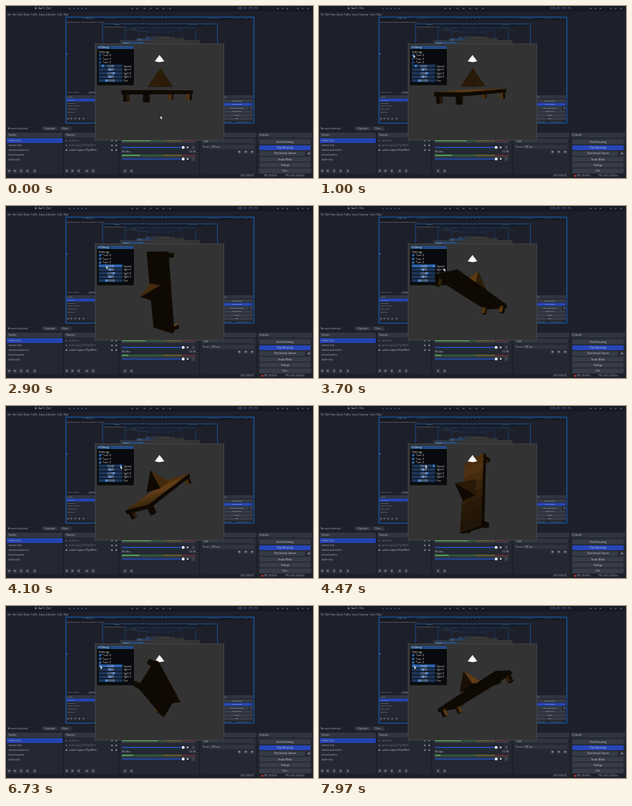
An HTML page that plays this animation: 384x216 px, repeating every 8000 ms.

```html
<!DOCTYPE html>
<html lang="en">
<head>
<meta charset="utf-8">
<title>Table viewer</title>
<style>
html, body { margin: 0; width: 100%; height: 100%; overflow: hidden; background: #1b1e27; }
svg { display: block; width: 100vw; height: 100vh; }
text { font-family: "Open Sans", "Noto Sans", sans-serif; white-space: pre; }
</style>
</head>
<body>
<svg id="stage" viewBox="0 0 384 216"></svg>
<script>
const LOOP = 8000;
const stage = document.getElementById('stage');
const clamp = (v, a, b) => Math.min(b, Math.max(a, v));

// ---- markup helpers
const rect = (x, y, w, h, fill, extra = '') =>
  `<rect x="${x}" y="${y}" width="${w}" height="${h}" fill="${fill}" ${extra}/>`;
const label = (x, y, s, size = 3, fill = '#a9aeb9', extra = '') =>
  `<text x="${x}" y="${y}" font-size="${size}" fill="${fill}" ${extra}>${s}</text>`;
const mid = (x, y, s, size, fill) => label(x, y, s, size, fill, 'text-anchor="middle"');
const dots = (xs, y, fill = '#a3a8b4', size = 1.7) =>
  xs.map(x => rect(x - size / 2, y - size / 2, size, size, fill, 'rx=".5"')).join('');
const tools = (xs, y) =>
  xs.map(x => rect(x - 2.5, y - 2.5, 5, 5, '#343945', 'rx=".8"')).join('') + dots(xs, y);

function dock(x, w, title) {
  return rect(x, 159, w, 52, '#242832', 'rx="1"') + rect(x, 159, w, 6, '#303541', 'rx="1"') +
    label(x + 2, 163.2, title, 3, '#c8ccd5');
}

function topBar() {
  return rect(0, 0, 384, 7, '#161a25') +
    label(36, 4, 'A  Sat 5  Oct', 3.6, '#c3c9d6') + dots([80, 85, 90, 95, 100], 3, '#5f7ca2', 1.4) +
    dots([158, 164, 173, 181, 189, 197, 205], 3, '#818ca2', 1.4) +
    label(290, 4, 'MIX  20   CPU  9%', 3.1, '#6b88b0') +
    dots([340, 346, 352, 365, 371, 378], 3, '#818ca2', 1.4) +
    label(2, 11.8, 'File  Edit  View  Docks  Profile  Scene Collection  Tools  Help', 2.8);
}

function lists() {
  const scenes = ['screen only', 'camera only', 'camera and screen', 'virtual camera', 'audio only'];
  const sources = ['webcam', 'audio capture (PipeWire)', 'screen capture (PipeWire)'];
  return label(2, 155, 'No source selected', 2.8) +
    rect(45, 151.5, 20, 5, '#303541', 'rx="1"') + label(48, 155, 'Properties', 2.8) +
    rect(67, 151.5, 15, 5, '#303541', 'rx="1"') + label(70, 155, 'Filters', 2.8) +
    dock(1, 70, 'Scenes') + rect(1, 166, 70, 6, '#2444b4') +
    scenes.map((s, i) => label(3, 170.3 + i * 6, s, 2.9)).join('') + tools([4, 11, 19, 27, 36], 207) +
    dock(73, 67, 'Sources') +
    sources.map((s, i) => dots([75.5], 169 + i * 6, i < 2 ? '#696e7b' : '#c3c7d0') +
      label(79, 170.3 + i * 6, s, 2.9, i < 2 ? '#6a6f7b' : '#b7bbc5') +
      dots([132.5, 138], 169 + i * 6, '#b0b4be')).join('') + tools([76, 83, 91, 101, 109], 207);
}

function mixer() {
  const ticks = (y) => `<path d="M145 ${y}H237" stroke="#8b909c" stroke-width=".9" stroke-dasharray=".9 1.5"/>`;
  const meter = (y, i) => [['#2f7537', 145, 51], ['#7d7527', 196, 24], ['#74302f', 220, 17]]
      .map(([c, x, w]) => rect(x, y, w, 1.3, c)).join('') +
    `<rect class="level${i}" x="145" y="${y}" width="20" height="1.3" fill="#62c45f"/>` + ticks(y + 2.7);
  const fader = y => rect(145, y, 77, 1.2, '#2656d0', 'rx=".6"') + rect(222, y, 3, 1.2, '#444955') +
    rect(220, y - 1.1, 3.2, 3.4, '#fff', 'rx="1"') + dots([227.3], y + .6, '#ddd', 2) +
    rect(232, y - 2, 4, 5, '#383d49', 'rx=".8"') + label(233, y + 2, '⋮', 4);
  return dock(142, 99, 'Audio Mixer') + meter(168.5, 0) + fader(177) +
    label(145, 184.3, 'Mic/Aux', 2.9) + label(229, 184.3, '0.0 dB', 2.9) +
    meter(186.8, 1) + fader(191.5) + tools([149, 157], 207);
}

function controls() {
  const names = ['Start Streaming', 'Stop Recording', 'Start Virtual Camera', 'Studio Mode', 'Settings', 'Exit'];
  return dock(243, 70, 'Scene Transitions') + rect(245, 167, 66, 5, '#303541', 'rx="1"') +
    label(247, 170.6, 'Fade', 2.9) + label(246, 178, 'Duration', 2.9) +
    rect(255, 174.5, 56, 5, '#303541', 'rx="1"') + label(257, 178, '300 ms', 2.9) +
    tools([292, 300, 308], 183.2) + dock(315, 68, 'Controls') +
    names.map((s, i) => rect(317, 167.6 + i * 7.3, i === 2 ? 57 : 64, 6, i === 1 ? '#2746b8' : '#363b47', 'rx="1"') +
      mid(349, 171.7 + i * 7.3, s, 2.9, '#c9ccd4')).join('') + tools([379], 185.2);
}

function viewer() {
  const rows = ['Speed', 'light X', 'light Y', 'light Z', 'Fov'];
  const values = ['0.500', '0.000', '2.000', '0.000', '45.000'];
  return rect(111.5, 47.5, 161, 121, '#333', 'stroke="#484b4f" stroke-width=".7"') +
    rect(114, 50, 46, 49.5, '#080a0d', 'rx="1"') + rect(114, 50, 46, 4, '#244b82', 'rx="1"') +
    label(116, 53.3, '▾ Debug', 3.2, '#ddd') + label(116, 58.8, 'Settings', 3.6, '#ddd') +
    ['Turn X', 'Turn Y', 'Turn Z'].map((s, i) => rect(116, 60 + i * 4.6, 3.4, 3.4, '#1d3c69') +
      label(121, 63 + i * 4.6, s, 3.5, '#ccc')).join('') +
    rows.map((s, i) => rect(116, 73.4 + i * 4.6, 29.5, 3.7, '#1d3658', i ? '' : 'class="speed"') +
      rect([0, 129, 134, 129, 124][i], 73.8 + i * 4.6, 2.4, 2.9, '#4389e0', i ? '' : 'class="grab"') +
      mid(131, 76.5 + i * 4.6, values[i], 3.3, '#d4d8de') +
      label(147, 76.5 + i * 4.6, s, 3.3, '#ccc')).join('');
}

// The preview shows the whole screen again.
function screen(depth) {
  const inner = depth
    ? `<g transform="translate(75 14) scale(.612 .616)">${screen(depth - 1)}</g>` : '';
  return rect(0, 0, 384, 216, '#1d202a') + topBar() + inner +
    rect(75, 14, 235, 133, 'none', 'stroke="#1769c9" stroke-width=".9"') +
    lists() + mixer() + controls() + label(293, 214.3, 'LIVE: 00:00:00', 2.6) +
    label(323, 214.3, 'REC: 00:00:03', 2.6) + label(349, 214.3, 'CPU: 0.6%, 60.00 fps', 2.6) + viewer();
}

stage.innerHTML = screen(4) +
  `<circle id="rec" cx="320.7" cy="213.2" r="1.2" fill="#e5333b"/>
   <g id="scene"></g>
   <g id="checks" fill="none" stroke="#5aa3ff" stroke-width=".8">
   ${[0, 1, 2].map(i => `<path d="M116.7 ${61.8 + i * 4.6}l.9 1 1.5-2.2"/>`).join('')}</g>
   <path id="pointer" d="M0 0v4.1l1-.9.8 1.6.7-.3-.8-1.6 1.3-.1z" fill="#fff" stroke="#111" stroke-width=".3"/>`;

const topmost = selector => [...document.querySelectorAll(selector)].pop();
const scene = document.getElementById('scene');
const pointer = document.getElementById('pointer');
const rec = document.getElementById('rec');
const checks = [...document.querySelectorAll('#checks path')];
const grab = topmost('.grab'), speed = topmost('.speed');
const levels = ['.level0', '.level1'].map(topmost);

// ---- vectors: x right, y down, z towards the viewer
const add = (a, b, k = 1) => a.map((v, i) => v + b[i] * k);
const mul = (a, k) => a.map(v => v * k);
const dot = (a, b) => a[0] * b[0] + a[1] * b[1] + a[2] * b[2];
const cross = (a, b) => [a[1] * b[2] - a[2] * b[1], a[2] * b[0] - a[0] * b[2], a[0] * b[1] - a[1] * b[0]];
const unit = a => mul(a, 1 / (Math.hypot(...a) || 1));

function basis(along, up) {
  const u = unit(along), n = unit(add(up, u, -dot(up, u)));
  return [u, n, cross(n, u)];
}

// time, direction of the long side, direction of the table's up
const poses = [
  [0, [.6, 0, -.8], [0, -1, 0]],
  [900, [.6, 0, -.8], [0, -1, 0]],
  [1730, [.6, -.38, -.7], [-.2, -.92, .33]],
  [2900, [-.08, -.95, .2], [-.75, .2, .6]],
  [3700, [.62, .42, -.66], [.21, -.9, -.38]],
  [4470, [.04, -.87, -.45], [-.7, -.3, .6]],
  [5300, [.24, .74, -.63], [.2, -.6, -.75]],
  [6600, [-.3, -.5, .8], [.6, .5, .55]],
  [7970, [.7, -.45, .55], [-.4, -.88, -.2]]
].map(([t, u, n]) => ({ t, axes: basis(u, n) }));

function segment(keys, t, time) {
  let i = 0;
  while (i < keys.length - 2 && time(keys[i + 1]) <= t) i++;
  const a = keys[i], b = keys[i + 1];
  return [a, b, (t - time(a)) / (time(b) - time(a))];
}

function pose(t) {
  const [a, b, k] = segment(poses, t, p => p.t);
  let axis = [0, 0, 0], trace = 0;
  a.axes.forEach((v, i) => { axis = add(axis, cross(v, b.axes[i])); trace += dot(v, b.axes[i]); });
  const angle = Math.acos(clamp((trace - 1) / 2, -1, 1)) * k;
  axis = unit(axis);
  const c = Math.cos(angle), s = Math.sin(angle);
  return a.axes.map(v => add(add(mul(v, c), cross(axis, v), s), axis, dot(axis, v) * (1 - c)));
}

// ---- model: coordinates are along, up, across
function box(x0, x1, y0, y1, z0, z1) {
  const p = i => [i & 1 ? x1 : x0, i & 2 ? y1 : y0, i & 4 ? z1 : z0];
  return [[0, 1, 3, 2], [4, 5, 7, 6], [0, 1, 5, 4], [2, 3, 7, 6], [0, 2, 6, 4], [1, 3, 7, 5]].map(f => f.map(p));
}
const board = [];
const SLICES = 8, HALF = 50, WIDE = 18;
for (let i = 0; i < SLICES; i++) {
  const w = 2 * HALF / SLICES, x = i * w - HALF;
  const faces = box(x, x + w, -2.5, 2, -WIDE, WIDE);
  board.push(...faces.slice(0, 4));
  if (i === 0) board.push(faces[4]);
  if (i === SLICES - 1) board.push(faces[5]);
}
const legs = [-45, 45].flatMap(x => [-15, 15].map(z => box(x - 2.5, x + 2.5, -11, -2.5, z - 2.5, z + 2.5)));
const base = [[-11, -11], [11, -11], [11, 11], [-11, 11]].map(([x, z]) => [x, 7, z]);
const pyramid = [base, ...base.map((p, i) => [p, base[(i + 1) % 4], [0, 30, 0]])];

const EYE = [0, 0, 330], LAMP = [0, -42, 6];
const centre = pts => mul(pts.reduce((a, b) => add(a, b)), 1 / pts.length);

function drawSolid(faces, axes) {
  const place = p => axes.reduce((s, a, i) => add(s, a, p[i]), [0, 0, 0]);
  const solid = place(centre(faces.map(centre)));
  return faces.map(f => {
    const pts = f.map(place), c = centre(pts);
    let n = unit(cross(add(pts[1], pts[0], -1), add(pts[2], pts[0], -1)));
    const body = faces === board ? place([centre(f)[0] * .98, -.25, 0]) : solid;
    if (dot(n, add(c, body, -1)) < 0) n = mul(n, -1);
    if (dot(n, add(EYE, c, -1)) <= 0) return '';
    const light = .13 + .8 * Math.max(0, dot(n, unit(add(LAMP, c, -1))));
    const fill = `rgb(${[115, 72, 24].map(v => Math.round(v * light))})`;
    const d = pts.map(([x, y, z]) => {
      const k = EYE[2] / (EYE[2] - z);
      return `${(193 + x * k).toFixed(2)},${(108 + y * k).toFixed(2)}`;
    }).join(' ');
    return `<polygon points="${d}" fill="${fill}" stroke="${fill}" stroke-width=".25"/>`;
  }).join('');
}

function drawTable(t) {
  const axes = pose(t), [u, n] = axes;
  const depth = l => { const c = centre(l.map(centre)); return axes.reduce((s, a, i) => s + a[2] * c[i], 0); };
  const feet = [...legs].sort((a, b) => depth(a) - depth(b)).map(l => drawSolid(l, axes)).join('');
  const parts = [feet, drawSolid(board, axes), drawSolid(pyramid, axes)];
  if (dot(n, EYE) < 0) parts.reverse();
  const lamp = '<path d="M192 61.5L198 69.4 192 70.6 186 69.4z" fill="#fff"/>';
  const behind = u[1] * u[2] < 0;
  return behind ? lamp + parts.join('') : parts.join('') + lamp;
}

// ---- pointer path: time, x, y
const path = [[0, 193, 138], [250, 193, 138], [850, 118, 61], [1300, 118, 61], [1730, 118, 65],
  [2150, 118, 70], [2500, 121, 75], [2900, 125, 75], [3400, 144, 75], [3700, 156, 78], [4100, 143, 75],
  [4470, 133, 74], [5300, 117, 75], [8000, 119, 75]];

function render(t) {
  scene.innerHTML = drawTable(t);
  const [a, b, k] = segment(path, t, p => p[0]);
  const x = a[1] + (b[1] - a[1]) * k, y = a[2] + (b[2] - a[2]) * k;
  pointer.setAttribute('transform', `translate(${x} ${y})`);
  checks.forEach((c, i) => c.setAttribute('opacity', t >= [900, 1760, 2200][i] ? 1 : 0));
  const dragging = t > 2500 && t < 4100 || t > 5000;
  speed.setAttribute('fill', dragging ? '#2f63ad' : '#1d3658');
  grab.setAttribute('x', t < 2500 ? 120 : clamp(dragging ? x - 1 : 142.5, 116.5, 142.5));
  rec.setAttribute('opacity', t > 400 ? 1 : 0);
  levels.forEach((m, i) => {
    const wave = Math.sin(t / 170 + i * 2) + Math.sin(t / 71 + i);
    m.setAttribute('width', (i ? 12 : 36) + 6 * wave);
  });
}

const start = performance.now();
function tick() {
  render((performance.now() - start) % LOOP);
  requestAnimationFrame(tick);
}
tick();
</script>
</body>
</html>
```
